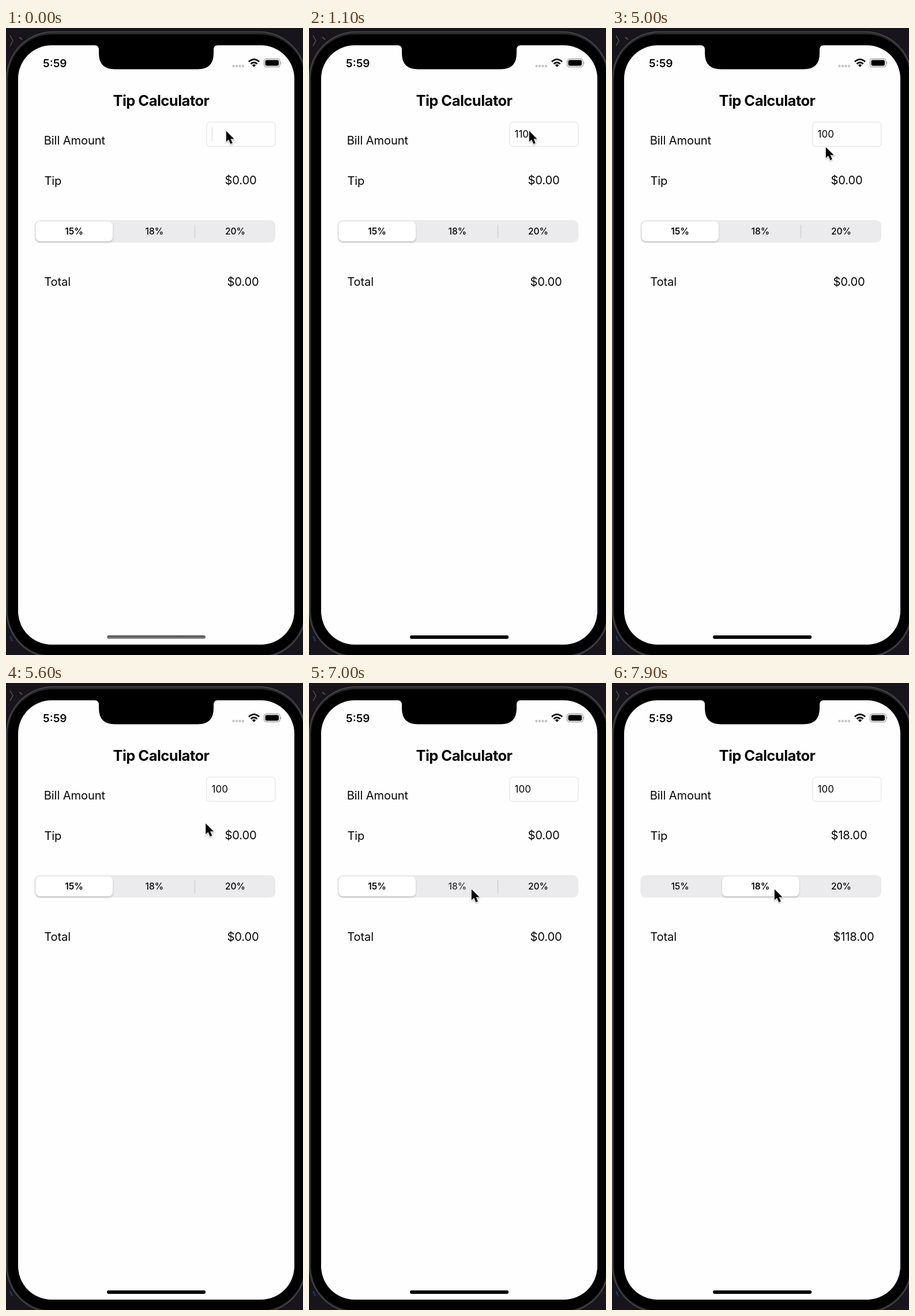
These frames come from a looping animation (515x1087 px, 8000 ms). An HTML page:

```html
<!DOCTYPE html>
<html lang="en">
<head>
<meta charset="utf-8">
<title>Tip Calculator</title>
<style>
  html, body { margin: 0; width: 100%; height: 100%; overflow: hidden; background: #17141c; }
  svg { display: block; width: 515px; height: 1087px; }
  text { font-family: Inter, "Liberation Sans", sans-serif; fill: #050505; }
  .label { font-size: 20.1px; letter-spacing: -.1px; }
  .title { font-size: 25.5px; font-weight: 700; letter-spacing: -.52px; }
  .clock { font-size: 19px; font-weight: 600; }
  .field { font-size: 17px; }
  .option { font-size: 15.5px; font-weight: 500; text-anchor: middle; }
  .option.on { font-weight: 600; }
</style>
</head>
<body>
<svg viewBox="0 0 515 1087">
  <defs>
    <linearGradient id="bar" x1="0" y1="0" x2="0" y2="1">
      <stop offset="0" stop-color="#484848"/>
      <stop offset="1" stop-color="#929292"/>
    </linearGradient>
    <filter id="lift" x="-10%" y="-20%" width="120%" height="150%">
      <feDropShadow dx="0" dy="1.8" stdDeviation="1.8" flood-opacity=".22"/>
    </filter>
    <filter id="shade" x="-30%" y="-20%" width="170%" height="150%">
      <feDropShadow dx="0" dy="1.5" stdDeviation="1.4" flood-opacity=".35"/>
    </filter>
  </defs>

  <!-- Desktop behind the phone -->
  <rect width="515" height="1087" fill="#17141c"/>
  <path d="M7 13l5 9-5 9" fill="none" stroke="#5d5a61" stroke-width="1.3"/>
  <path d="M23 16l5 4" stroke="#6b4a2c" stroke-width="2"/>
  <path d="M7 1054l4 9" stroke="#1d3c74" stroke-width="2"/>

  <!-- Phone body, screen and notch -->
  <rect x="1" y="6.5" width="519" height="1085" rx="81" fill="#29282a" stroke="#4b4a4c" stroke-width="1.5"/>
  <rect x="3.5" y="11" width="514" height="1077" rx="77"/>
  <rect x="21" y="30" width="479" height="1039" rx="58" fill="#fffeff"/>
  <path d="M154 29H367V30Q360 30 360 38V44Q360 71.5 332 71.5H189Q161 71.5 161 44V38Q161 30 154 30Z"/>

  <!-- Status bar -->
  <text class="clock" x="64" y="67.5">5:59</text>
  <g fill="#c5c4c8">
    <circle cx="394.5" cy="66" r="2.2"/><circle cx="400" cy="66" r="2.2"/>
    <circle cx="405.5" cy="66" r="2.2"/><circle cx="411" cy="66" r="2.2"/>
  </g>
  <g fill="none" stroke="#000" stroke-width="2.8">
    <path d="M421 58.6Q430 50.2 439 58.6"/>
    <path d="M424.4 62.3Q430 57.2 435.6 62.3"/>
  </g>
  <path d="M426.8 64.4Q430 61.8 433.2 64.4L430 67.8Z"/>
  <rect x="447.5" y="53.5" width="27.5" height="14" rx="4" fill="none" stroke="#858487" stroke-width="1.1"/>
  <rect x="449.5" y="55.5" width="23.5" height="10" rx="2.4"/>
  <path d="M476.4 58.3q2 2.2 0 4.4z" fill="#858487"/>

  <!-- Form -->
  <text class="title" x="185.4" y="134.5">Tip Calculator</text>
  <text class="label" x="65.8" y="201.5">Bill Amount</text>
  <text class="label" x="66.4" y="272.3">Tip</text>
  <text class="label" x="66.2" y="447">Total</text>
  <text class="label" id="tip" x="379.4" y="271.2"></text>
  <text class="label" id="total" x="383.4" y="447"></text>
  <rect x="347.8" y="163.2" width="119" height="42" rx="5.5" fill="#fffeff" stroke="#e4e3e9" stroke-width="1.2"/>
  <rect id="caret" x="356.6" y="172" width="1.8" height="24" fill="#e2e1e9"/>
  <text class="field" id="bill" x="356.5" y="190.2"></text>

  <!-- Segmented control -->
  <rect x="49.3" y="333" width="417.7" height="39" rx="9.5" fill="#ebeaec"/>
  <rect id="line" x="326.8" y="341.5" width="1.3" height="23" fill="#cfced3"/>
  <rect id="thumb" x="51.5" y="335.5" width="133.5" height="34.3" rx="7.5" fill="#fff" filter="url(#lift)"/>
  <text class="option" x="118" y="358.3">15%</text>
  <text class="option" x="257.3" y="358.3">18%</text>
  <text class="option" x="397.5" y="358.3">20%</text>

  <!-- Home indicator -->
  <rect x="175.2" y="1053" width="170.8" height="6.1" rx="3" fill="url(#bar)"/>
  <rect id="home" x="175.2" y="1053" width="170.8" height="6.1" rx="3"/>

  <g id="pointer">
    <path d="M0 0V20.6L4.6 16.4L8.2 24.6L12 23L8.5 15H14.9Z" transform="translate(.8 1.4) scale(.92)"
          stroke="#fff" stroke-width="1.8" paint-order="stroke" filter="url(#shade)"/>
  </g>
</svg>
<script>
  const LOOP = 8000, TICK = 100;
  const $ = id => document.getElementById(id);
  const options = document.querySelectorAll(".option");

  // [time, typed amount]
  const typing = [[0, ""], [500, "1"], [700, "11"], [1100, "110"], [2100, "11"],
                  [2300, "1"], [3100, "10"], [3300, "100"]];

  // [time, x, y] of the pointer tip
  const path = [[0, 381, 177], [4900, 381, 177], [5000, 370, 205], [5200, 354, 222],
                [5400, 345, 237], [5800, 346, 247], [6000, 357, 280], [6200, 371, 324],
                [6300, 378, 344], [6400, 376, 357], [6500, 353, 364], [6600, 318, 364],
                [6700, 291, 360], [6800, 283, 357], [6900, 281, 356], [8000, 281, 356]];

  const PRESS = 6900, PICK = 7100;
  const clamp = v => Math.min(1, Math.max(0, v));
  const ease = v => 1 - (1 - v) ** 3;
  const money = v => "$" + v.toFixed(2);

  function pointerAt(t) {
    const i = path.findIndex(p => p[0] > t);
    const [t0, x0, y0] = path[i - 1], [t1, x1, y1] = path[i];
    const k = (t - t0) / (t1 - t0);
    return [x0 + (x1 - x0) * k, y0 + (y1 - y0) * k];
  }

  function draw(t) {
    const picked = t >= PICK;
    const amount = typing.filter(s => s[0] <= t).pop()[1];
    const tip = picked ? amount * 0.18 : 0;
    const slide = ease(clamp((t - PICK + TICK) / 500));

    $("bill").textContent = amount;
    $("caret").setAttribute("opacity", amount ? 0 : 1);
    $("tip").textContent = money(tip);
    $("total").textContent = money(picked ? +amount + tip : 0);

    $("home").setAttribute("opacity", clamp((t - 400) / 400));
    $("thumb").setAttribute("x", 51.5 + 139.5 * slide);
    $("line").setAttribute("opacity", 1 - slide);
    options.forEach((o, i) => o.classList.toggle("on", i === (picked ? 1 : 0)));
    options[1].setAttribute("opacity", t >= PRESS && !picked ? 0.8 : 1);

    $("pointer").setAttribute("transform", `translate(${pointerAt(t)})`);
  }

  const start = performance.now();
  function loop() {
    const t = (performance.now() - start) % LOOP;
    draw(Math.floor(t / TICK) * TICK);
    requestAnimationFrame(loop);
  }
  loop();
</script>
</body>
</html>
```
